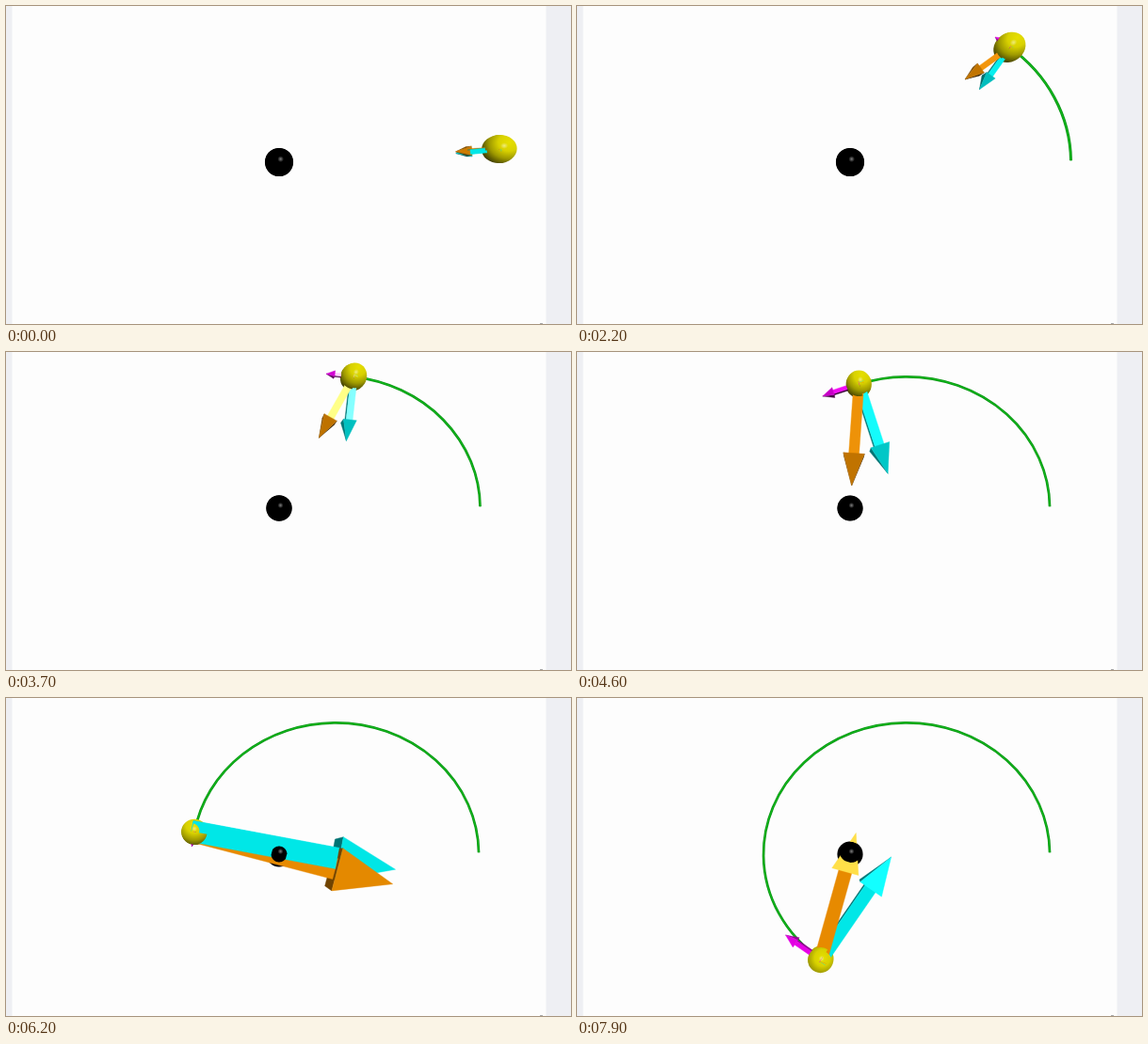
Recreate the animation shown at these times as an HTML page with a canvas. Size 600 px wide and 338 px high, loop 8 s.

```html
<!DOCTYPE html>
<html>
<head>
<meta charset="utf-8">
<style>
html, body { margin: 0; width: 100%; height: 100%; overflow: hidden; background: #fdfdfd; }
canvas { display: block; }
</style>
</head>
<body>
<canvas id="stage" width="600" height="338"></canvas>
<script>
const ctx = document.getElementById('stage').getContext('2d');
const LOOP = 8000, STEP = 100;
const CX = 290, CY = 166, CAMERA = 312;
const A = 152, ECC = 0.395, B = A * Math.sqrt(1 - ECC * ECC);
const PULL = 1.875e6, RADIUS = 13.6;
const KEY = [0.22, 0.44, 0.88], FILL = [-0.88, -0.22, -0.44];
const YELLOW = [240, 232, 0], BLACK = [0, 0, 0];
const ORANGE = [255, 153, 0], CYAN = [0, 255, 255], MAGENTA = [255, 0, 255];

// [seconds, value] pairs
const ANOMALY = [[0, .126], [1, .658], [1.8, 1.063], [2.2, 1.224], [2.7, 1.476],
  [3.7, 1.841], [5.4, 2.677], [6.9, 3.355], [7.9, 3.753]];
const ZOOM = [[0, 1.106], [2.6, 1.106], [2.7, 1.1], [3, 1.07], [3.2, 1.046], [3.7, 1.007], [4.4, 1], [8, 1]];

const dot = (a, b) => a[0] * b[0] + a[1] * b[1] + a[2] * b[2];
const unit = v => v.map(c => c / Math.hypot(...v));
const rgb = c => `rgb(${c.map(v => Math.round(Math.min(255, v)))})`;

function lookup(keys, t) {
  const i = Math.max(1, keys.findIndex(k => k[0] >= t));
  const [t0, v0] = keys[i - 1], [t1, v1] = keys[i];
  return v0 + (v1 - v0) * (t - t0) / (t1 - t0);
}

function project([x, y, z]) {
  const k = CAMERA / (CAMERA - z);
  return [CX + x * k, CY - y * k];
}

function trace(points) {
  ctx.beginPath();
  points.forEach(p => ctx.lineTo(...project(p)));
  ctx.closePath();
}

const facing = (p, n) => n[0] * -p[0] + n[1] * -p[1] + n[2] * (CAMERA - p[2]) > 0;

function face(points, normal, color) {
  if (!facing(points[0], normal)) return;
  const mid = [0, 1, 2].map(i => points.reduce((sum, p) => sum + p[i], 0) / points.length);
  const view = unit([-mid[0], -mid[1], CAMERA - mid[2]]);
  const lit = Math.max(0, dot(normal, KEY));
  const mirror = normal.map((c, i) => 2 * lit * c - KEY[i]);
  const shine = lit && 100 * Math.max(0, dot(mirror, view)) ** 100;
  const level = 0.2 + 0.8 * lit + 0.3 * Math.max(0, dot(normal, FILL));
  trace(points);
  ctx.fillStyle = ctx.strokeStyle = rgb(color.map(c => c * level + shine));
  ctx.lineWidth = 0.4;
  ctx.fill();
  ctx.stroke();
}

function makeArrow(from, v) {
  const len = Math.hypot(...v), u = [v[0] / len, v[1] / len];
  return {
    len, u, neck: 0.7 * len, shaft: 0.05 * len, head: 0.1 * len,
    at: (s, d, z) => [from[0] + u[0] * s - u[1] * d, from[1] + u[1] * s + u[0] * d, z]
  };
}

function drawShaft({ u, neck, shaft: w, at }, color) {
  const back = [-u[0], -u[1], 0];
  face([at(0, -w, -w), at(0, w, -w), at(0, w, w), at(0, -w, w)], back, color);
  for (const k of [-1, 1])
    face([at(0, k * w, -w), at(neck, k * w, -w), at(neck, k * w, w), at(0, k * w, w)],
      [-u[1] * k, u[0] * k, 0], color);
  face([at(0, -w, w), at(neck, -w, w), at(neck, w, w), at(0, w, w)], [0, 0, 1], color);
}

function drawHead({ u, len, neck, head: w, at }, color) {
  const tip = at(len, 0, 0), p = 0.316, q = 0.949;
  face([at(neck, -w, -w), at(neck, w, -w), at(neck, w, w), at(neck, -w, w)], [-u[0], -u[1], 0], color);
  for (const k of [-1, 1])
    face([at(neck, k * w, -w), at(neck, k * w, w), tip],
      [u[0] * p - u[1] * q * k, u[1] * p + u[0] * q * k, 0], color);
  face([at(neck, -w, w), at(neck, w, w), tip], [u[0] * p, u[1] * p, q], color);
}

function drawArrow(arrow, color) {
  const parts = [drawShaft, drawHead];
  if (facing(arrow.at(arrow.neck, 0, 0), [-arrow.u[0], -arrow.u[1], 0])) parts.reverse();
  parts.forEach(part => part(arrow, color));
}

function drawBall(x, y, r, color) {
  const angle = Math.atan2(-y, x), view = unit([-x, -y, CAMERA]), along = dot(KEY, view);
  const hx = (KEY[0] - along * view[0]) * r, hy = -(KEY[1] - along * view[1]) * r;
  ctx.save();
  ctx.translate(CX + x, CY - y);
  ctx.rotate(angle);
  ctx.scale(Math.hypot(1, Math.hypot(x, y) / CAMERA), 1);
  ctx.rotate(-angle);
  ctx.beginPath();
  ctx.arc(0, 0, r, 0, 7);
  const body = ctx.createRadialGradient(hx, hy, 0, hx, hy, r * 1.75);
  [[0, .96], [.35, .9], [.65, .66], [1, .22]].forEach(([at, k]) =>
    body.addColorStop(at, rgb(color.map(c => c * k))));
  ctx.fillStyle = body;
  ctx.fill();
  const glint = ctx.createRadialGradient(hx / 2, hy / 2, 0, hx / 2, hy / 2, r * 0.22);
  glint.addColorStop(0, 'rgba(255,255,255,.5)');
  glint.addColorStop(1, 'rgba(255,255,255,0)');
  ctx.fillStyle = glint;
  ctx.fill();
  ctx.restore();
}

// Redraws the part of a ball that bulges through an arrow on whose axis it sits.
function bulge({ len, neck, shaft, head, at }, s0, x, y, r, color) {
  const left = [], right = [], start = Math.max(0, s0 - r);
  for (let i = 0; i <= 60; i++) {
    const s = start + (s0 + r - start) * i / 60;
    const h = s < neck ? shaft : head * Math.max(0, len - s) / (len - neck);
    const room = r * r - (s - s0) ** 2 - h * h;
    if (room <= 0) continue;
    left.push(at(s, -Math.sqrt(room), h));
    right.unshift(at(s, Math.sqrt(room), h));
  }
  ctx.save();
  trace([...left, ...right]);
  ctx.clip();
  drawBall(x, y, r, color);
  ctx.restore();
}

function drawTrail(zoom, E) {
  for (const [width, color] of [[2.7, '#0a9414'], [1.2, '#12b81c']]) {
    ctx.beginPath();
    ctx.ellipse(CX + A * ECC * zoom, CY, A * zoom, B * zoom, 0, -0.012, -E, true);
    ctx.lineWidth = width * zoom;
    ctx.strokeStyle = color;
    ctx.stroke();
  }
}

function draw(t) {
  const zoom = lookup(ZOOM, t), M = lookup(ANOMALY, t);
  let E = M;
  for (let i = 0; i < 40; i++) E = M - ECC * Math.sin(E);

  const x = zoom * A * (ECC + Math.cos(E)), y = zoom * B * Math.sin(E);
  const dist = Math.hypot(x, y), r = RADIUS * zoom;
  const size = PULL * zoom ** 3 / dist ** 2;
  const pull = [-x / dist * size, -y / dist * size];
  const dir = unit([-A * Math.sin(E), B * Math.cos(E)]);
  const k = pull[0] * dir[0] + pull[1] * dir[1];
  const along = [dir[0] * k, dir[1] * k];
  const total = makeArrow([x, y], pull);
  const normal = makeArrow([x, y], [pull[0] - along[0], pull[1] - along[1]]);

  ctx.fillStyle = '#fdfdfd';
  ctx.fillRect(0, 0, 600, 338);
  ctx.fillStyle = '#eeeff3';
  ctx.fillRect(0, 0, 6.5, 338);
  ctx.fillRect(573.5, 0, 27, 338);
  ctx.fillStyle = '#aaa';
  ctx.fillRect(567, 337, 3, 1);

  drawTrail(zoom, E);
  drawBall(x, y, r, YELLOW);
  drawArrow(normal, CYAN);
  bulge(normal, 0, x, y, r, YELLOW);
  drawBall(0, 0, r, BLACK);
  drawArrow(total, ORANGE);
  if (normal.len > 0.995 * total.len) drawShaft(normal, CYAN);
  bulge(total, dist, 0, 0, r, BLACK);
  bulge(total, 0, x, y, r, YELLOW);
  if (Math.abs(k) > 1) {
    const tangent = makeArrow([x, y], along);
    drawArrow(tangent, MAGENTA);
    bulge(tangent, 0, x, y, r, YELLOW);
  }
}

const begin = performance.now();
function tick() {
  const ms = (performance.now() - begin) % LOOP;
  draw(Math.floor(ms / STEP) * STEP / 1000);
  requestAnimationFrame(tick);
}
tick();
</script>
</body>
</html>
```
